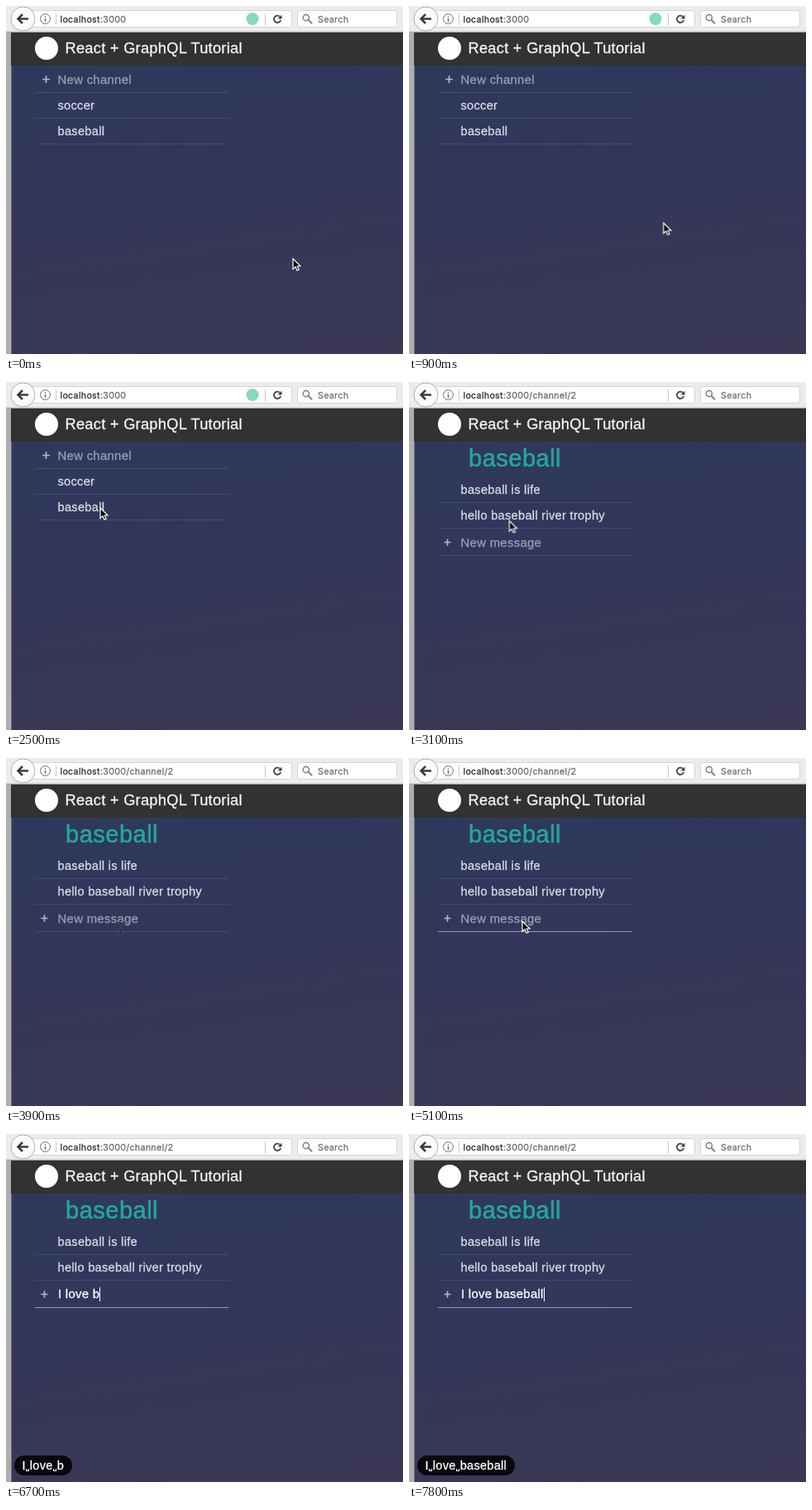
An HTML page for the animation above (8 s loop, 480 by 420 pixels).

```html
<!DOCTYPE html>
<html lang="en">
<head>
<meta charset="utf-8">
<title>Channel list</title>
<style>
html, body { margin: 0; width: 100%; height: 100%; overflow: hidden; }
body { position: relative; background: #ececec; font-family: "Liberation Sans", Arial, sans-serif; letter-spacing: .3px; }
.page { position: absolute; left: 6px; top: 72px; width: 474px; height: 348px;
  background: linear-gradient(172deg, #2d395c, #34365a 46%, #3a3855); }
svg { position: absolute; left: 0; top: 0; }
text { white-space: pre; stroke-width: .3; }
.chrome { font: 10.7px Inter, "Open Sans", sans-serif; }
.title { font-size: 18.2px; fill: #f8f8f8; stroke: #f8f8f8; }
.heading { font-size: 29px; letter-spacing: .5px; fill: #26a69a; stroke: #26a69a; stroke-width: .6; }
.row { font-size: 14.6px; fill: #d9dbe3; stroke: #d9dbe3; }
.hint { font-size: 14.9px; fill: #999dae; stroke: #999dae; }
.rule { stroke: #fff; stroke-opacity: .1; }
.plus { stroke: #b4b8c4; stroke-width: 1.7; }

/* one shared 8 s clock */
.loop { animation: 8s infinite step-end; }
#list { animation-name: list; }
#channel { animation-name: channel; }
#focus { animation-name: focus; }
#arrow { animation-name: arrow; }
#beam { animation-name: beam; }
#mouse { animation: move 8s infinite linear; }
@keyframes list { 0% { visibility: visible } 35%, 100% { visibility: hidden } }
@keyframes channel { 0% { visibility: hidden } 35%, 100% { visibility: visible } }
@keyframes focus { 0% { opacity: 0 } 56.25%, 100% { opacity: 1 } }
@keyframes arrow { 0% { opacity: 1 } 43.75% { opacity: 0 } 56.25% { opacity: 1 } 70%, 100% { opacity: 0 } }
@keyframes beam { 0% { opacity: 0 } 43.75% { opacity: 1 } 56.25%, 100% { opacity: 0 } }
@keyframes move {
  0%, 2.5% { transform: translate(347px, 305px); animation-timing-function: ease-in }
  11.25% { transform: translate(308px, 262px); animation-timing-function: ease-out }
  27.5%, 35% { transform: translate(114px, 152px); animation-timing-function: ease-in-out }
  45%, 56.25% { transform: translate(139px, 205px) }
  57.5%, 100% { transform: translate(137px, 197px) }
}

#typed, #keys { position: absolute; color: #fff; white-space: pre; -webkit-text-stroke: .3px #fff; }
#typed { left: 63px; top: 183px; font-size: 14.9px; line-height: 20px; }
#typed::after { content: ""; display: inline-block; width: 1px; height: 17px; vertical-align: -4px; background: #fff; }
#keys { left: 10px; top: 388px; height: 24px; padding: 0 9.5px; border-radius: 12px;
  background: #08080d; font-size: 14.5px; line-height: 24px; }
#keys i { display: inline-block; box-sizing: border-box; width: 4px; height: 3px; margin: 0 .5px;
  border: solid #fff; border-width: 0 1px 1px; vertical-align: -2px; }
[hidden] { display: none; }
</style>
</head>
<body>
<div class="page"></div>
<svg width="480" height="420" viewBox="0 0 480 420">
  <rect y="30" width="480" height="1" fill="#dcdcdc"/>
  <rect y="31" width="480" height="1" fill="#a8a8a8"/>
  <rect y="32" width="6.5" height="388" fill="#aeaeae"/>
  <rect x="6" y="32" width="474" height="40" fill="#323232"/>

  <g class="chrome">
    <rect x="20" y="5.5" width="325.5" height="20" rx="3" fill="#fff" stroke="#d2d2d2"/>
    <rect x="352.5" y="5.5" width="120" height="20" rx="3" fill="#fff" stroke="#d2d2d2"/>
    <circle cx="20.5" cy="15.5" r="14.5" fill="#fafafa" stroke="#adadad"/>
    <path d="M27 15.5H15M20 10l-5.5 5.5 5.5 5.5" fill="none" stroke="#3c3c3c" stroke-width="2.5"/>
    <circle cx="47.5" cy="15.5" r="6" fill="none" stroke="#6e6e6e"/>
    <path d="M47.5 14.5v4.5M47.5 11.8v1.5" stroke="#6e6e6e" stroke-width="1.4"/>
    <path d="M60.5 9v14M313.5 9v14" stroke="#c8c8c8"/>
    <path d="M331.2 12.9A4.2 4.2 0 1 0 332.2 17" fill="none" stroke="#444" stroke-width="1.8"/>
    <path d="M333.5 10.5v5h-5z" fill="#444"/>
    <circle cx="362.8" cy="14" r="3.6" fill="none" stroke="#858585" stroke-width="1.6"/>
    <path d="M365.5 16.7l4.500 4.500" stroke="#858585" stroke-width="2"/>
    <text x="377" y="19.5" fill="#757575" stroke="#757575">Search</text>
  </g>

  <circle cx="49" cy="51" r="14" fill="#fff"/>
  <text class="title" x="71.5" y="57">React + GraphQL Tutorial</text>

  <g id="list" class="loop">
    <text class="chrome" x="65.5" y="19.5" fill="#333" stroke="#333">localhost<tspan fill="#6c6c6c" stroke="#6c6c6c">:3000</tspan></text>
    <circle cx="298" cy="15.5" r="7.5" fill="#84d8c4"/>
    <path class="plus" d="M44 88.5h9M48.5 84v9"/>
    <text class="hint" x="62.5" y="94">New channel</text>
    <text class="row" x="62.5" y="124.5">soccer</text>
    <text class="row" x="62.5" y="155.5">baseball</text>
    <path class="rule" d="M35 104.5H269M35 135.5H269M35 166.5H269"/>
  </g>

  <g id="channel" class="loop">
    <text class="chrome" x="65.5" y="19.5" fill="#333" stroke="#333">localhost<tspan fill="#6c6c6c" stroke="#6c6c6c">:3000/channel/2</tspan></text>
    <text class="heading" x="72" y="101.5">baseball</text>
    <text class="row" x="62.5" y="134.5">baseball is life</text>
    <text class="row" x="62.5" y="165.5">hello baseball river trophy</text>
    <path class="plus" d="M42.5 193.5h8M46.5 189.5v8"/>
    <text id="hint" class="hint" x="62.5" y="198.5">New message</text>
    <path class="rule" d="M35 145.5H269M35 176.5H269M35 209.5H269"/>
    <path id="focus" class="loop" d="M35 209.5H269" stroke="#9599ab"/>
  </g>
</svg>

<div id="typed" hidden></div>
<div id="keys" hidden></div>

<svg width="480" height="420" viewBox="0 0 480 420">
  <defs>
    <path id="bar" d="M-3.5-6.5Q0-6.5 0-4.5 0-6.5 3.5-6.5M0-4.5V4.5M-3.5 6.5Q0 6.5 0 4.5 0 6.5 3.5 6.5M-2 2.5H2"/>
  </defs>
  <g id="mouse">
    <path id="arrow" class="loop" d="M0 0V12.5L3 9.8 5 14.3 7.2 13.3 5.2 9H9Z" fill="#000" stroke="#fff" stroke-width="1.2"/>
    <g id="beam" class="loop" fill="none">
      <use href="#bar" stroke="#7d8197" stroke-width="2"/>
      <use href="#bar" stroke="#15161f" stroke-width="1.2"/>
    </g>
  </g>
</svg>

<script>
const LOOP = 8000, TYPE_START = 5600, KEY_MS = 150;
const message = "I love baseball";
const [typed, keys, hint] = ["typed", "keys", "hint"].map(id => document.getElementById(id));
const start = performance.now();
let shown = -1;

function draw() {
  const t = (performance.now() - start) % LOOP;
  const count = t < TYPE_START ? 0 : Math.min(message.length, Math.floor((t - TYPE_START) / KEY_MS) + 1);
  if (count !== shown) {
    shown = count;
    const part = message.slice(0, count);
    typed.textContent = part;
    keys.innerHTML = part.replaceAll(" ", "<i></i>");
    typed.hidden = keys.hidden = !count;
    hint.style.opacity = count ? 0 : 1;
  }
  requestAnimationFrame(draw);
}
draw();
</script>
</body>
</html>
```
